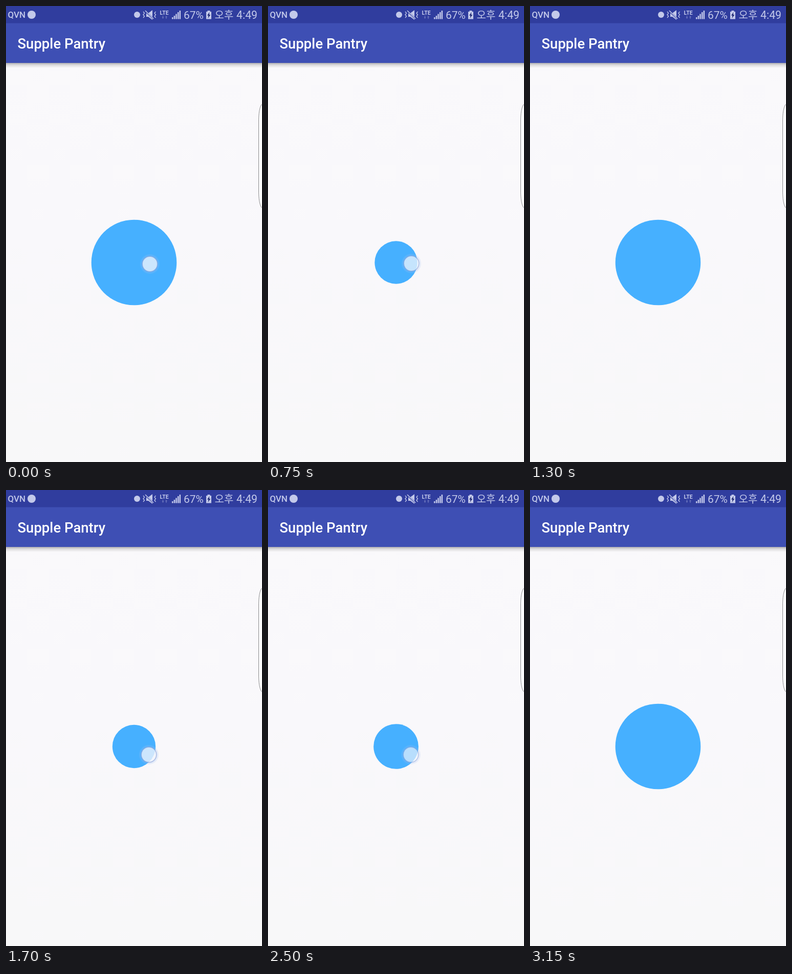
These frames come from a looping animation (500 px wide and 889 px high, 3200 ms). An HTML page:

```html
<!DOCTYPE html>
<html lang="ko">
<head>
<meta charset="utf-8">
<title>Supple Pantry</title>
<style>
  html, body { margin: 0; width: 100%; height: 100%; overflow: hidden; background: #f9f8fb; }
  svg { display: block; width: 100vw; height: 100vh; }
  text { font-family: Roboto, "Noto Sans CJK KR", "Noto Sans CJK", sans-serif; }
</style>
</head>
<body>
<svg viewBox="0 0 500 889" preserveAspectRatio="none">
  <defs>
    <linearGradient id="page" x1="0" y1="0" x2="0" y2="1">
      <stop offset="0" stop-color="#faf9fb"/>
      <stop offset=".5" stop-color="#f9f8fb"/>
      <stop offset="1" stop-color="#f8f8f9"/>
    </linearGradient>
    <linearGradient id="shade" x1="0" y1="0" x2="0" y2="1">
      <stop offset="0" stop-color="#000" stop-opacity=".3"/>
      <stop offset=".4" stop-color="#000" stop-opacity=".12"/>
      <stop offset="1" stop-color="#000" stop-opacity="0"/>
    </linearGradient>
  </defs>

  <rect width="500" height="889" fill="url(#page)"/>
  <rect y="111" width="500" height="10" fill="url(#shade)"/>
  <rect y="33" width="500" height="78" fill="#3e4fb4"/>
  <rect width="500" height="33.5" fill="#303d9e"/>
  <text x="22.5" y="83" font-size="27.5" font-weight="500" fill="#fff">Supple Pantry</text>

  <!-- status bar -->
  <g fill="#c3c9ea">
    <text x="3.5" y="23" font-size="17" font-weight="500">QVN</text>
    <circle cx="50" cy="17" r="8"/>
    <circle cx="256" cy="17" r="6"/>
    <path d="M274 14h4l8-6v19l-8-6h-4z"/>
    <g fill="none" stroke="#c3c9ea" stroke-width="1.3">
      <path d="M268 11l2.5 3-2.5 3 2.5 3-2.5 3M292.500 11l-2.500 3 2.500 3-2.500 3 2.500 3"/>
      <path d="M272 10l16 15" stroke="#303d9e" stroke-width="3"/>
      <path d="M272 9l16 16" stroke-width="1.6"/>
    </g>
    <text x="300.500" y="17" font-size="10.500" font-weight="700">LTE</text>
    <path d="M306.500 25l-2-3h1.300v-3h1.400v3h1.300zM313 19l2 3h-1.300v3h-1.400v-3h-1.300z" opacity=".4"/>
    <path d="M324 22h2.500v3.500h-2.500zM327.700 19h2.500v6.500h-2.500zM331.300 15.500h2.500v10h-2.500zM335 12h2.500v13.500h-2.500zM338.600 9h2.500v16.500h-2.500z"/>
    <text x="347" y="25" font-size="21">67%</text>
    <path d="M393.500 9h5v2h2.500v14.500h-10V11h2.500z"/>
    <path d="M397.500 12l-4.500 6.500h2.500l-1 5.500 4.800-7h-2.600z" fill="#1c2670"/>
    <text x="407.500" y="24.500" font-size="20">오후</text>
    <text x="450" y="25" font-size="21.300">4:49</text>
  </g>

  <path d="M500.500 191C496 194 493.500 207 493.500 224V361C493.500 378 496 391 500.500 394" fill="#fcfcfd" stroke="#8a8a8c"/>

  <circle id="ball" cx="250" cy="500" fill="#46b0ff"/>
  <g id="touch">
    <circle r="19" fill="#a0bef0" fill-opacity=".2"/>
    <circle r="16.500" fill="#96b4eb" fill-opacity=".22"/>
    <circle r="14.700" fill="#fff" fill-opacity=".67" stroke="#7d96d2" stroke-opacity=".55" stroke-width="1.400"/>
  </g>
</svg>
<script>
  const LOOP = 3200, STEP = 50, RADIUS = 83.3, FADE = 200;
  const TENSION = 809.4, FRICTION = 22;
  const ball = document.getElementById('ball');
  const touch = document.getElementById('touch');

  const moves = [
    { at: 30, from: 1, to: 0.5 },
    { at: 765, from: 0.5, to: 1 },
    { at: 1626, from: 1, to: 0.5 },
    { at: 2488, from: 0.5, to: 1 }
  ];
  const presses = [
    { down: 0, up: 740, from: [281, 503], to: [280, 502], drift: 400 },
    { down: 1600, up: 2470, from: [279, 516], to: [279, 516], drift: 400 }
  ];

  const clamp = v => Math.min(1, Math.max(0, v));
  const mix = (a, b, p) => a + (b - a) * p;

  // Step response of an underdamped spring, t in seconds
  function spring(t) {
    const decay = FRICTION / 2;
    const freq = Math.sqrt(TENSION - decay * decay);
    const wave = Math.cos(freq * t) + decay / freq * Math.sin(freq * t);
    return 1 - Math.exp(-decay * t) * wave;
  }

  function scaleAt(t) {
    const move = moves.filter(m => m.at <= t).pop();
    return move ? mix(move.from, move.to, spring((t - move.at) / 1000)) : 1;
  }

  function draw(t) {
    ball.setAttribute('r', (RADIUS * scaleAt(t)).toFixed(2));
    const press = presses.filter(p => p.down <= t).pop();
    const p = clamp((t - press.down) / press.drift);
    const [x, y] = press.from.map((v, i) => mix(v, press.to[i], p));
    touch.setAttribute('transform', `translate(${x} ${y})`);
    touch.setAttribute('opacity', 1 - clamp((t - press.up) / FADE));
  }

  let start;
  function tick(now) {
    if (start === undefined) start = now;
    const t = (now - start) % LOOP;
    draw(Math.floor(t / STEP + 0.01) * STEP % LOOP);
    requestAnimationFrame(tick);
  }
  draw(0);
  requestAnimationFrame(tick);
</script>
</body>
</html>
```
